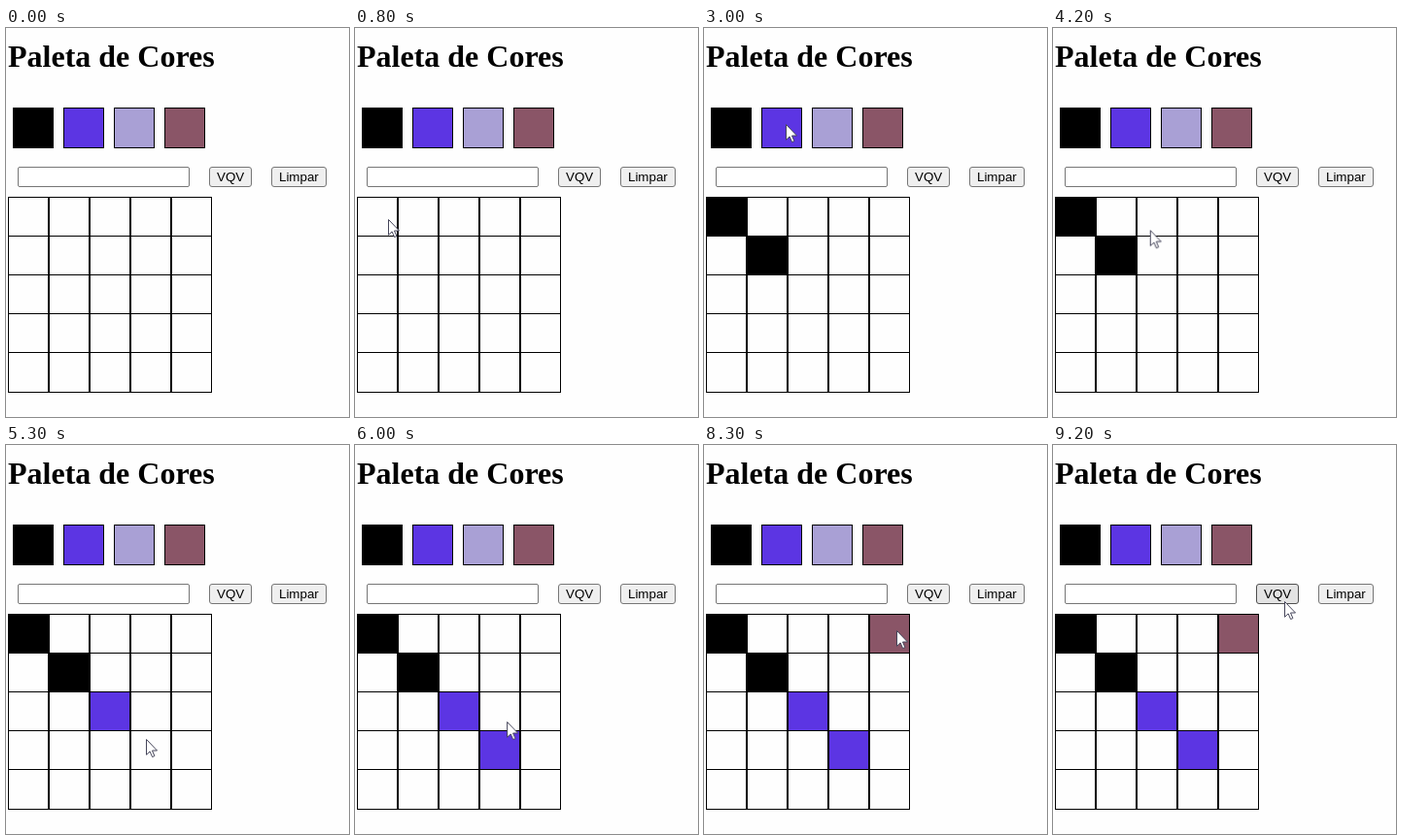
An HTML page for the animation above (10 s loop, 353x401 px).

```html
<!DOCTYPE html>
<html lang="pt">
<head>
<meta charset="utf-8">
<title>Paleta de Cores</title>
<style>
:root { --blue: #5c35e3; --lilac: #a9a0d5; --wine: #8a5567; --paper: #fefefe; }
* { box-sizing: border-box; }
html, body { margin: 0; width: 100%; height: 100%; overflow: hidden; background: var(--paper); }
body { position: relative; }
h1, .swatch, .field, .button, .board, .cursor { position: absolute; }
h1 { left: 2px; top: 11px; margin: 0; font: bold 32px/36px "Liberation Serif", "Times New Roman", serif; color: #000; white-space: nowrap; }

.swatch { top: 82px; width: 42px; height: 42px; border: 1px solid #000; }
.field, .button { top: 143px; height: 21px; border: 1px solid #767676; }
.field { left: 12px; width: 177px; border-radius: 2px; background: #fff; }
.button { padding: 0 7px; border-radius: 3px; background: #efefef; color: #000; font: 13.333px/19px "Liberation Sans", Arial, sans-serif; }

.board { left: 2px; top: 174px; display: grid; grid-template: repeat(5, 40px) / repeat(5, 42px); }
.board i { height: 41px; border: 1px solid #000; }
.board i:nth-child(n+21) { height: 42px; }

/* The 1 ms lead keeps step edges on the right side of each tenth of a second. */
.board i, .hover, .cursor { animation: 10s -1ms infinite step-end; }
.board i:nth-child(1) { animation-name: fill1; }
.board i:nth-child(7) { animation-name: fill2; }
.board i:nth-child(13) { animation-name: fill3; }
.board i:nth-child(19) { animation-name: fill4; }
.board i:nth-child(5) { animation-name: fill5; }
@keyframes fill1 { 12%, 100% { background: #000; } }
@keyframes fill2 { 21%, 100% { background: #000; } }
@keyframes fill3 { 49%, 100% { background: var(--blue); } }
@keyframes fill4 { 59%, 100% { background: var(--blue); } }
@keyframes fill5 { 83%, 100% { background: var(--wine); } }

.hover { animation-name: hover; }
@keyframes hover { 92%, 100% { background: #e3e3e3; border-color: #4f4f4f; } }

.cursor { left: 0; top: 0; width: 13px; height: 20px; overflow: visible; animation-name: move; }
.cursor path { fill: #fff; stroke: #45455a; stroke-linejoin: round; }
@keyframes move {
  0% { transform: translate(-50px, -50px); }
  3% { transform: translate(290px, 330px); animation-timing-function: steps(2, start); }
  5% { transform: translate(130px, 240px); animation-timing-function: steps(4, start); }
  9%, 14% { transform: translate(34px, 197px); animation-timing-function: steps(4, start); }
  18%, 25% { transform: translate(66px, 233px); animation-timing-function: steps(1, start); }
  26%, 27% { transform: translate(67px, 231px); animation-timing-function: steps(4, start); }
  31% { transform: translate(84px, 99px); animation-timing-function: steps(2, start); }
  33%, 38% { transform: translate(86px, 102px); animation-timing-function: steps(8, start); }
  46%, 51% { transform: translate(108px, 272px); animation-timing-function: steps(3, start); }
  54% { transform: translate(144px, 303px); animation-timing-function: steps(2, start); }
  56%, 60% { transform: translate(150px, 312px); animation-timing-function: steps(7, start); }
  67%, 73% { transform: translate(193px, 123px); animation-timing-function: steps(6, start); }
  79%, 89% { transform: translate(198px, 191px); animation-timing-function: steps(4, start); }
  93%, 100% { transform: translate(238px, 161px); }
}
</style>
</head>
<body>
<h1>Paleta de Cores</h1>
<div class="swatch" style="left:7px;background:#000"></div>
<div class="swatch" style="left:59px;background:var(--blue)"></div>
<div class="swatch" style="left:111px;background:var(--lilac)"></div>
<div class="swatch" style="left:163px;background:var(--wine)"></div>
<div class="field"></div>
<div class="button hover" style="left:209px">VQV</div>
<div class="button" style="left:273px">Limpar</div>
<div class="board">
  <i></i><i></i><i></i><i></i><i></i>
  <i></i><i></i><i></i><i></i><i></i>
  <i></i><i></i><i></i><i></i><i></i>
  <i></i><i></i><i></i><i></i><i></i>
  <i></i><i></i><i></i><i></i><i></i>
</div>
<svg class="cursor" viewBox="0 0 13 20"><path d="M.5 .5V16.3L4.1 12.9L6.6 18.6L8.9 17.6L6.5 12H11.5Z"/></svg>
</body>
</html>
```
